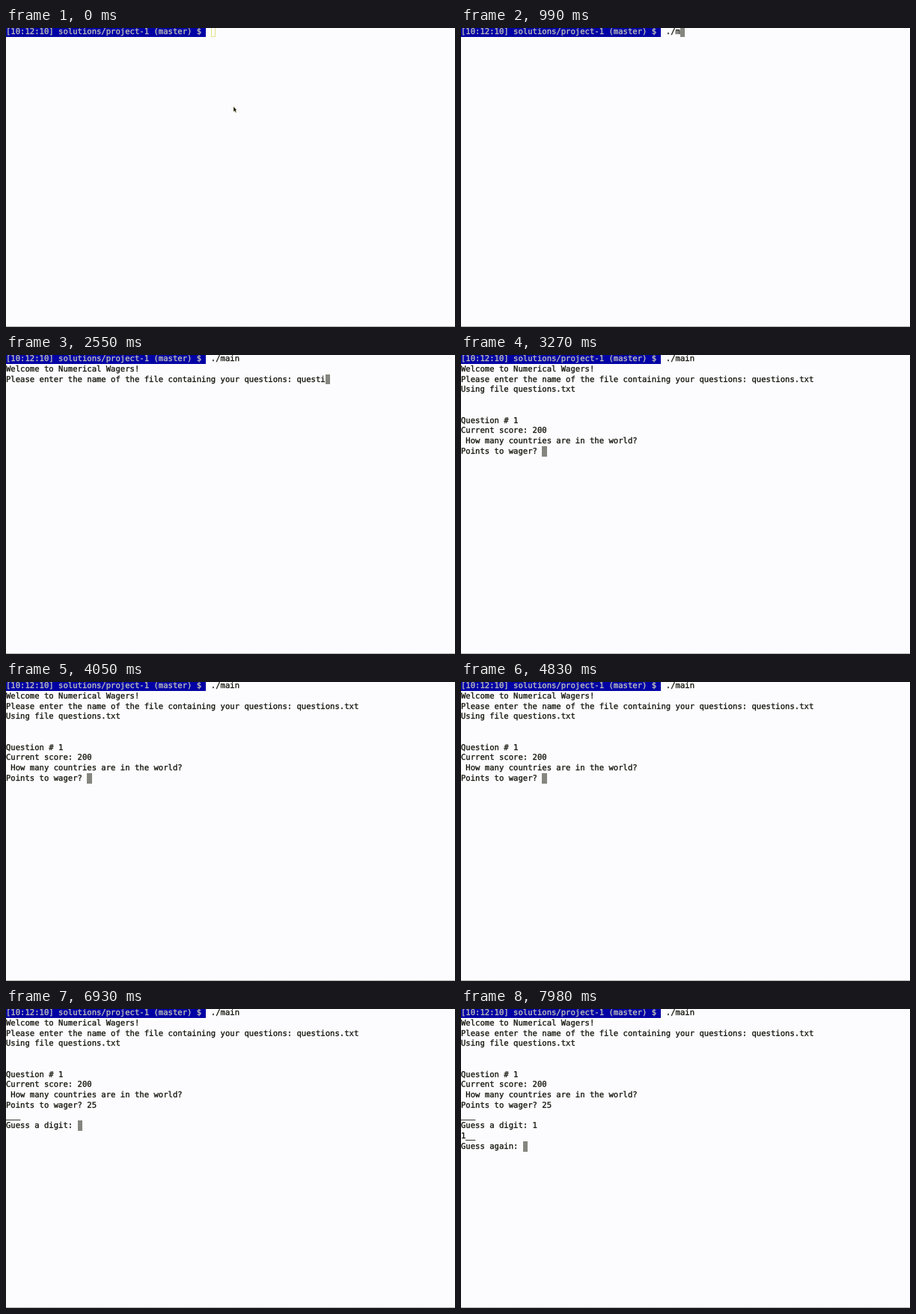
An HTML page that plays this animation: 600x400 px, repeating every 8 s.

```html
<!DOCTYPE html>
<html lang="en">
<head>
<meta charset="utf-8">
<title>Terminal session</title>
<style>
  html, body { margin: 0; width: 100%; height: 100%; overflow: hidden; background: #fcfcfe; }
  #stage { position: relative; width: 600px; height: 400px; overflow: hidden; }
  #terminal {
    position: absolute; left: 0; top: -2px; margin: 0;
    font: 10.58px/13.77px "DejaVu Sans Mono", monospace;
    text-rendering: geometricPrecision;
    -webkit-text-stroke: .3px;
    color: #12120a;
  }
  #prompt, #cursor { display: inline-block; box-sizing: border-box; height: 13.77px; vertical-align: top; }
  #prompt { padding-top: 1px; background: #0000a4; color: #c6c6b8; }
  #output { position: relative; top: 1px; }
  #cursor { width: 1ch; background: #868680; }
  #cursor.hollow { background: none; border: 1px solid #e2e28c; }
  #pointer { position: absolute; left: 303px; top: 104px; }
  #edge {
    position: absolute; left: 0; bottom: 0; width: 100%; height: 1px;
    background: repeating-linear-gradient(90deg, #8c8c8c 0 1px, #dcdcdc 1px 2px);
  }
</style>
</head>
<body>
<div id="stage">
  <pre id="terminal"><span id="prompt">[10:12:10] solutions/project-1 (master) $ </span> <span id="output"></span><span id="cursor"></span></pre>
  <svg id="pointer" width="7" height="10"><path d="M1 1V8L2.6 6.8L3.8 9.3L4.8 8.8L3.9 6.3L5.2 5.8Z" fill="#18180a" stroke="#e8e8b0" stroke-width=".4"/></svg>
  <div id="edge"></div>
</div>
<script>
const LOOP = 8000;
const FOCUS_TIME = 90;
const TYPING_START = 510;
const byId = id => document.getElementById(id);
const output = byId("output"), cursor = byId("cursor"), pointer = byId("pointer");

const type = (start, interval, text) =>
  [...text].map((char, i) => [start + i * interval, char]);

// Each entry is [time in ms, text added to the screen].
const events = [
  ...type(TYPING_START, 90, "./"),
  [870, "m"],
  [1140, "ain "],
  [1590, "\nWelcome to Numerical Wagers!\nPlease enter the name of the file containing your questions: "],
  ...type(1980, 120, "ques"),
  ...type(2430, 81, "tions.txt"),
  [3210, "\nUsing file questions.txt\n\n\nQuestion # 1\nCurrent score: 200\n How many countries are in the world?\nPoints to wager? "],
  ...type(5430, 300, "25"),
  [6450, "\n___\nGuess a digit: "],
  [7110, "1"],
  [7350, "\n1__\nGuess again: "],
];

function draw(now) {
  const time = now % LOOP;
  const text = events.filter(([at]) => at <= time).map(([, part]) => part).join("");
  if (output.textContent !== text) output.textContent = text;
  cursor.classList.toggle("hollow", time < FOCUS_TIME);
  pointer.style.visibility = time < TYPING_START ? "visible" : "hidden";
}

const start = performance.now();
function tick() {
  draw(performance.now() - start);
  requestAnimationFrame(tick);
}
tick();
</script>
</body>
</html>
```
